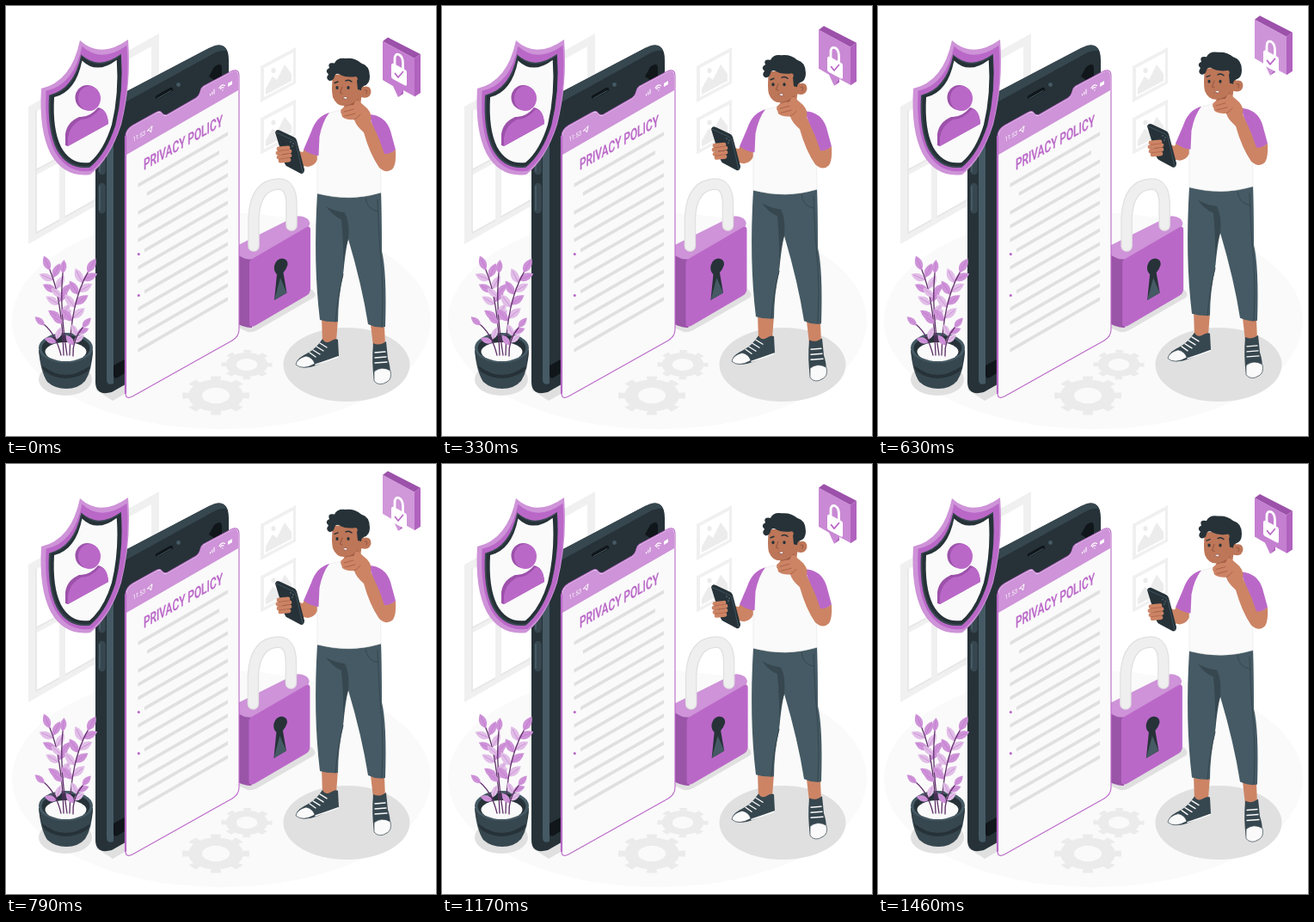
These frames come from a looping animation (500 by 500 pixels, 1.5 s). An HTML page:

```html
<!DOCTYPE html>
<html lang="en">
<head>
<meta charset="utf-8">
<title>Privacy policy</title>
<style>
html, body { margin: 0; width: 100%; height: 100%; overflow: hidden; background: #fff; }
svg { display: block; width: 100vw; height: 100vh; }
text { font-family: Roboto, Inter, sans-serif; }
.line { fill: none; stroke-linecap: round; stroke-linejoin: round; }
</style>
</head>
<body>
<svg viewBox="0 0 500 500">
  <defs>
    <path id="shield" d="M41 96Q76 88 86 40Q110 62 142 39Q146 90 134 138Q121 178 98 196Q68 200 52 172Q38 145 41 96Z"/>
    <g id="picture">
      <path fill="#f0f0f0" d="M296 70 337 48V90L296 112Z"/>
      <path fill="#fff" d="M300 72 334 54V88L300 106Z"/>
      <path fill="#ececec" d="M302 103V96L310 82 315 86 324 68 332 79V87Z"/>
      <ellipse cx="311" cy="75" rx="2.6" ry="3" fill="#ececec"/>
    </g>
    <g id="gear" fill="none" stroke="#ebebeb">
      <circle r="24" stroke-width="16"/>
      <circle r="35" stroke-width="8" pathLength="8" stroke-dasharray=".42 .58" stroke-dashoffset=".21"/>
    </g>
  </defs>

  <ellipse cx="250.5" cy="366" rx="243.5" ry="126" fill="#fafafa"/>

  <!-- wall -->
  <path fill="#f0f0f0" d="M26 117 178 32V190L26 277Z"/>
  <path fill="#fff" d="M36 122 62 107V176L36 190ZM69 103 169 47V116L69 172ZM36 196 62 182V249L36 263ZM69 178 169 122V187L69 245Z"/>
  <path class="line" stroke="#e6e6e6" stroke-width="1.5" d="M35 122V264L62 249M69 245 110 222M36 190 62 176"/>
  <use href="#picture"/>
  <use href="#picture" y="60.5"/>

  <!-- floor -->
  <use href="#gear" transform="translate(244 453) scale(1 .58)"/>
  <use href="#gear" transform="translate(280 417) scale(.76 .44)"/>
  <ellipse cx="396" cy="417" rx="73.5" ry="43" fill="#e0e0e0"/>
  <path fill="#e0e0e0" d="M104 446 124 459 140 450V435ZM268 373 281 379Q286 380 292 377L358 339Q362 335 355 329Z"/>

  <!-- padlock -->
  <g id="padlock">
    <path fill="#9a54a8" d="M262 282 286 292V374Q278 375 262 366Z"/>
    <path fill="#ce93d8" d="M262 282 334 246Q342 242 350 247 355 251 352 257L288 294Q280 296 272 291L262 284Z"/>
    <path fill="#ba68c8" d="M283 299Q283 295 288 293L349 257.500Q354 255 354 260V329Q354 334 349 337L290 371.500Q283 375 283 369Z"/>
    <path class="line" stroke="#e0e0e0" stroke-width="13.500" d="M288 279V246Q290 208 317 207 332 207 332 231V255"/>
    <path class="line" stroke="#efefef" stroke-width="11" d="M288 279V246Q290 208 317 207 332 207 332 231V255"/>
    <path fill="#263238" d="M315 312Q311 308 312 302 314 294 321 293.500 328 294 327.500 301 326 306 322.500 310L326.500 333.500 312 342Z"/>
    <path fill="#455a64" d="M319 316 326.500 333.500 312 342Z"/>
  </g>

  <!-- phone -->
  <path fill="#263238" d="M104 136Q104 120 118 111L236 49Q259 38 259 63V380L137 441 123 449Q104 454 104 437Z"/>
  <path fill="#37474f" d="M118 111 236 49Q252 40 257 52 249 51 240 56L142 110 118 124Z"/>
  <path fill="#455a64" d="M117 150V434Q117 442 125 439V150Z"/>
  <path fill="#10161a" d="M125 418 138 411V427L130 432Q125 434 125 429ZM236 82 242 71Q251 64 251 73V92Z"/>
  <path class="line" stroke="#10161a" stroke-width="4.500" d="M176 106 192 97"/>
  <path class="line" stroke="#455a64" d="M176 107.500 192 98.500"/>
  <circle cx="200.500" cy="91.500" r="2.400" fill="#455a64"/>
  <path class="line" stroke="#37474f" stroke-width="8.500" d="M111.500 174V192M111.500 210V237"/>
  <path class="line" stroke="#455a64" stroke-width="2" d="M109 174V192M109 210V237"/>

  <path fill="#fafafa" stroke="#ba68c8" stroke-width="1.100" d="M139 152Q139 144 147 139L174 124Q179 121 181 124 183 128 188 126L221 107Q225 104 226 99 227 94 232 92L262 76Q271 72 271 82V376Q271 384 263 389L147 454Q139 458 139 450Z"/>
  <path fill="#ce93d8" d="M140 152Q140 145 147 140L174 125Q179 122 181 125 183 129 188 127L221 108Q225 105 226 100 227 95 232 93L262 77Q270 73 270 82V98L140 173Z"/>
  <path class="line" stroke="#ba68c8" stroke-width="2.200" d="M139 152V450"/>
  <text transform="matrix(.78 -.45 0 1 147.500 158)" font-size="7.500" fill="#fff">11:53</text>
  <path class="line" stroke="#fff" d="M164.500 145 170 139.500 168.500 147 167 144.500ZM237.500 104V102.500M239.800 103V100M242 102V97"/>
  <path class="line" stroke="#fff" stroke-width="1.200" d="M248 95.500Q251 90.500 254.500 92.500M249.500 96.500Q251 94 253 95"/>
  <path fill="#fff" d="M251 97.500h1.500v1h-1.500ZM258 90 263 87V91L258 94Z"/>
  <text transform="matrix(.66 -.375 0 1 160 191)" font-size="18" font-weight="500" fill="#ba68c8" stroke="#ba68c8" stroke-width=".3">PRIVACY POLICY</text>
  <path id="copy" fill="#e0e0e0"/>
  <path class="line" stroke="#ba68c8" stroke-width="3.200" d="M154.300 288.500v.01M154.300 336.500v.01"/>

  <!-- shield -->
  <use href="#shield" fill="#ce93d8"/>
  <use href="#shield" fill="#ba68c8" transform="translate(8.500 9.500) scale(.93)"/>
  <use href="#shield" fill="#37474f" transform="translate(16 23) scale(.83 .84)"/>
  <use href="#shield" fill="#263238" transform="translate(19 26) scale(.805 .815)"/>
  <use href="#shield" fill="#fafafa" transform="translate(26.500 33) scale(.72 .76)"/>
  <ellipse cx="94.500" cy="106.500" rx="14" ry="14.500" fill="#9c51aa"/>
  <ellipse cx="97" cy="107.500" rx="13" ry="14.500" fill="#ba68c8"/>
  <path fill="#9c51aa" d="M69 162V149Q71 135 85 129 97 130 107 118 118 120 119 137L72 163Z"/>
  <path fill="#ba68c8" d="M72 163V153Q74 139 87 132 99 132 109 120 118 121 119 137Z"/>

  <!-- plant -->
  <ellipse cx="69" cy="434" rx="31" ry="19" fill="#e0e0e0"/>
  <path fill="#37474f" d="M38 400Q40 425 48 437 57 445 70 445 84 445 92 436 100 424 101 400Z"/>
  <path fill="#263238" d="M38 398Q39 410 43 419 69 439 97 419 101 410 101 398L97 422Q69 441 43 422Z"/>
  <path fill="#263238" d="M43 419Q69 439 97 419L95 425Q69 441 45 425Z"/>
  <ellipse cx="69.500" cy="397.500" rx="31.500" ry="17.500" fill="#455a64"/>
  <ellipse cx="69.500" cy="398" rx="28" ry="15" fill="#263238"/>
  <ellipse cx="69.500" cy="402" rx="24" ry="11" fill="#fafafa"/>
  <g id="plant"></g>

  <!-- man -->
  <g id="man">
    <g fill="#cc8465">
      <path d="M367 362 386 364 384 390 368 392ZM424 370 440 372 441 396 427 396Z"/>
      <path d="M350 160 364 170Q363 185 351 187L331 183V166L345 170Z"/>
    </g>
    <path fill="#37474f" d="M368 387Q371 393 377 390 383 386 386 388L387 407Q376 411 363 417 345 424 338 417 336 411 350 404 360 399 368 387ZM427 392Q434 396 442 390L444 410Q450 428 443 437 434 442 428 435 425 415 427 392Z"/>
    <path fill="#fafafa" stroke="#37474f" stroke-width=".7" d="M337 417Q338 410 349 407 357 409 359 416 345 424 337 417ZM428 425Q437 418 447 424 449 434 443 437 434 443 428 436Z"/>
    <path class="line" stroke="#fafafa" stroke-width="1.400" d="M353 403 360 408M357 400 365 405M361 396 369 401M365 392 373 397M429 403 441 402M429 409 442 408M429 415 443 414M360 417Q375 412 386 408"/>
    <path fill="#455a64" d="M362 217Q400 226 436 215 437 240 437 285 443 310 441 373 431 375 421 370 414 325 398 271 395 282 392 312 386 340 386 367 375 368 365 365 357 300 362 217Z"/>
    <path fill="#37474f" d="M372 233Q383 239 394 240 400 252 398 271 393 285 392 310 393 280 390 248 380 244 372 233Z"/>
    <path class="line" stroke="#37474f" d="M418 222Q419 237 433 239M432 225Q434 280 437 305 439 340 437 373M392 312Q386 335 383 367"/>
    <path fill="#fafafa" stroke="#e6e6e6" stroke-width=".6" d="M374 125Q395 117 423 126L435 152 436 217Q400 228 362 218V150Z"/>
    <path fill="#ba68c8" d="M376 124Q361 128 355 146L346 167Q354 173 363.500 174L364.500 152Q368 134 376 124ZM422 126Q441 127 447 145L453 167Q445 175 436 172L431 153Z"/>

    <!-- head, raised arm -->
    <path fill="#bd7658" d="M397 108 414 100 411 124Q401 134 389 124L393 117Z"/>
    <path fill="#bd7658" d="M380 80Q378 98 380 106 384 116 393 116 405 115 413 106 423 109 424.500 100 424 92 416 94L409 78Z"/>
    <path fill="#9c5a42" d="M394 116Q405 114 410 107 406 120 396 121Z"/>
    <path fill="#263238" d="M376 87Q371 84 375 79.500 370 75 376 72 373 65 382 66.500 385 59.500 395 61 406 60 413 66.500 423 69 423 82 423 91 416 93 413 94 413 98L409 97 408 87Q410 84 407 82 395 84 387 79 383 78 382 82 381 87 376 87Z"/>
    <ellipse cx="385" cy="95" rx="1.600" ry="2" fill="#263238"/>
    <ellipse cx="398" cy="95" rx="1.600" ry="2" fill="#263238"/>
    <path class="line" stroke="#263238" stroke-width="1.400" d="M382 89.500 386 88M395 87Q399 85 402 88"/>
    <path class="line" stroke="#9c5a42" stroke-width="1.200" d="M391 94 388.500 101 391 102M417 98Q421 97 419 102"/>
    <path fill="#fafafa" stroke="#8a4536" stroke-width=".6" d="M391 107Q394 104.500 397 106L396 108.500Z"/>
    <path fill="#cc8465" d="M389 121Q394 115 404 115L406 111Q409 108 412 112L420 119Q426 126 424 133L434 155 440 172Q448 172 453 167 454 183 450 189 443 196 434 188 423 172 416 147 406 138 405 132 397 133 391 129Z"/>
    <path class="line" stroke="#a95f45" stroke-width=".9" d="M393 123 404 120M394 128 406 125M405 132Q409 130 412 126"/>

    <!-- handset -->
    <path fill="#263238" d="M313 147Q314 143 318 144.500L334 152Q337 153 338 156L347 190Q347 195 343 195L328 187Q325 186 324 183Z"/>
    <path class="line" stroke="#455a64" stroke-width=".8" d="M314 147 334 156Q336 157 337 159L345 194"/>
    <path class="line" stroke="#52656e" stroke-width="1.800" d="M331 158v.01M334 160v.01M333 163v.01"/>
    <path class="line" stroke="#cc8465" stroke-width="4.800" d="M317 166 328 165M316 171 330 169M317 176 330 174M319 180 329 179"/>
    <path class="line" stroke="#a95f45" stroke-width=".7" d="M317 168.500 329 167M317 173.500 329 171.500M318 178 329 176.500"/>
  </g>

  <!-- speech badge -->
  <g id="badge">
    <path fill="#9c51aa" d="M438 41 444 36.500 482 56 475 61Z"/>
    <path fill="#b062be" d="M475 61 482 56V101L475 105.500ZM456 106 462 102V97Z"/>
    <path fill="#ba68c8" d="M438 41 475 61V105L462 98 456 106 450 93 438 86Z"/>
    <path id="shine" fill="#fff" d="M438 41 475 61V105L462 98 456 106 450 93 438 86Z"/>
  </g>
  <g id="badgeLock">
    <path class="line" stroke="#fff" stroke-width="2.800" d="M452 72V62Q452 55 457 56.500 461.500 59 461.500 66V76"/>
    <path fill="#fff" d="M448 69Q448 66 451 67L464 74Q466 75 466 77V91Q466 94 463 92L450 85Q448 84 448 82Z"/>
    <path class="line" stroke="#ba68c8" stroke-width="1.700" d="M452.500 78.500 456 83 461.500 76.500"/>
  </g>
</svg>
<script>
const $ = id => document.getElementById(id);

// Paragraph lines: one every 16 px, two of them after bullets
const slope = .577;
let copy = '';
for (let i = 0; i < 13; i++) {
  const left = i === 1 ? 164 : i === 5 || i === 8 ? 161 : 153.5;
  const width = (i === 1 ? 248 : 258) - left;
  const y = 210.5 + 16 * i - slope * (left - 154);
  copy += `M${left} ${y}l${width} ${-slope * width}v-4.2l${-width} ${slope * width}z`;
}
$('copy').setAttribute('d', copy);

// A stem is a quadratic curve with leaf pairs and a leaf at its tip
function stem(x0, y0, cx, cy, x1, y1, pairs, size) {
  const mix = (a, b, c, k) => (1 - k) ** 2 * a + 2 * k * (1 - k) * b + k * k * c;
  let out = '';
  const leaf = (x, y, angle, color) => {
    out += `<g transform="translate(${x} ${y}) rotate(${angle}) scale(${size})">
      <path fill="${color}" d="M0 0Q-10-8 0-20Q9-9 0 0"/><path class="line" stroke="#ba68c8" stroke-width=".5" d="M0 0V-16"/></g>`;
  };
  for (let i = 0; i <= pairs; i++) {
    const k = .35 + .65 * i / pairs, x = mix(x0, cx, x1, k), y = mix(y0, cy, y1, k);
    const dx = (1 - k) * (cx - x0) + k * (x1 - cx), dy = (1 - k) * (cy - y0) + k * (y1 - cy);
    const angle = Math.atan2(dx, -dy) * 180 / Math.PI;
    if (i === pairs) leaf(x, y, angle, '#ce93d8');
    else {
      leaf(x, y, angle - 50, i % 2 ? '#e1bee7' : '#ce93d8');
      leaf(x, y - 3, angle + 42, i % 2 ? '#ce93d8' : '#e1bee7');
    }
  }
  return out + `<path class="line" stroke="#5e3068" stroke-width="1.3" d="M${x0} ${y0}Q${cx} ${cy} ${x1} ${y1}"/>`;
}
$('plant').innerHTML =
  stem(67, 406, 65, 340, 51, 307, 4, .9) +
  stem(71, 406, 62, 350, 66, 311, 2, .8) +
  stem(74, 406, 75, 345, 95, 310, 4, .95) +
  stem(64, 406, 58, 382, 45, 371, 1, .75) +
  stem(78, 407, 77, 388, 89, 374, 2, .75);

const shake = [0, -1, 2, -3, 3, -3, 3, -3, 2, -1, 0];
const move = (id, x, y) => $(id).setAttribute('transform', `translate(${x} ${y})`);

function draw() {
  const p = performance.now() % 1500 / 1500;
  const lift = 1 - Math.abs(2 * p - 1);
  move('man', 0, -8.5 * lift);
  move('badge', 0, -30 * lift);
  move('badgeLock', 0, -18 * lift);
  $('shine').setAttribute('opacity', .14 + .18 * lift);

  const i = Math.floor(p * 10), k = 1 - (1 - p * 10 + i) ** 1.6;
  move('padlock', shake[i] + (shake[i + 1] - shake[i]) * k, 0);
  requestAnimationFrame(draw);
}
draw();
</script>
</body>
</html>
```
